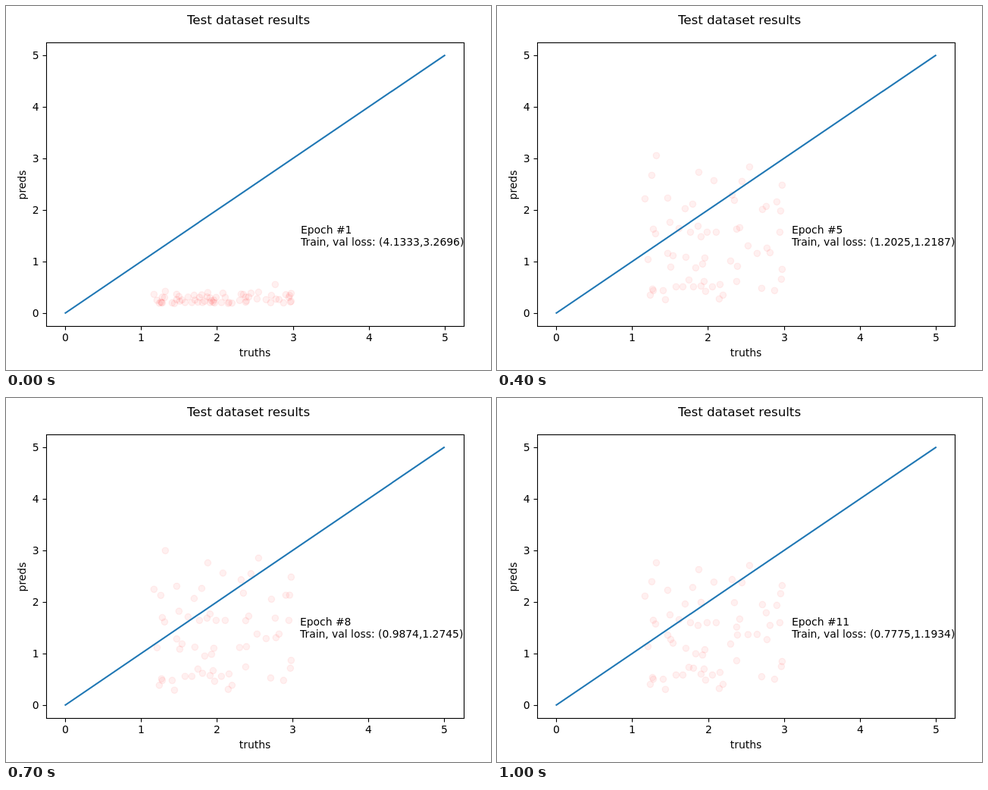
An HTML page that plays this animation: 640x480 px, repeating every 1100 ms.

```html
<!DOCTYPE html>
<html lang="en">
<head>
<meta charset="utf-8">
<title>Test dataset results</title>
<style>
  html, body { margin: 0; width: 100%; height: 100%; overflow: hidden; background: #fff; }
  svg { display: block; width: 640px; height: 480px; }
  text { font: 13.89px "DejaVu Sans", sans-serif; fill: #000; }
  .title { font-size: 16.67px; }
  .mid { text-anchor: middle; }
  .end { text-anchor: end; }
  .axis { fill: none; stroke: #000; stroke-width: 1.11; }
  .dot { fill: red; stroke: red; stroke-width: 1.39; fill-opacity: .06; stroke-opacity: .06; }
  .diagonal { stroke: rgb(31, 119, 180); stroke-width: 2.08; stroke-linecap: square; }
</style>
</head>
<body>
<svg id="plot" viewBox="0 0 640 480"></svg>
<script>
const STEP = 100, X0 = 78, Y0 = 405.5;
const plot = document.getElementById('plot');

// Per epoch: losses, pixels per unit on x, share of drift, heights of the knots.
const KNOTS = [197, 254, 298, 345, 387];
const EPOCHS = [
  ['4.1333,3.2696', 100.2, 0, [376, 380, 384, 389, 392]],
  ['2.9986,2.6180', 100.05, 0, [330, 349, 362, 378, 390]],
  ['1.7767,1.9574', 100.2, 0, [253, 296, 326, 360, 388]],
  ['1.3862,1.4571', 100.2, 0, [217, 269, 308, 350, 387]],
  ['1.2025,1.2187', 100.2, 0, KNOTS],
  ['1.0418,1.2343', 100.2, .15, [193, 250, 294, 343, 386]],
  ['0.9229,1.2898', 100.05, .3, [194, 248, 291, 341, 386]],
  ['0.9874,1.2745', 100.05, .45, [201, 252, 293, 340, 385]],
  ['1.1571,1.2613', 100.05, .6, [208, 256, 295, 340, 385]],
  ['0.9136,1.2207', 100.2, .8, [213, 259, 296, 339, 384]],
  ['0.7775,1.1934', 100.25, 1, [217, 261, 296, 337, 384]]
];

// x, height, late drift
const POINTS = [
  [195, 254], [210, 197], [199, 334], [206, 294], [209, 300], [202, 381],
  [205, 373], [206, 375], [219, 375], [222, 387], [225, 253, -7], [228, 285],
  [225, 326, -8], [229, 344, -18], [232, 329], [236, 370], [240, 293], [245, 370],
  [248, 267], [249, 331, 5], [253, 361], [255, 298], [258, 261, -17], [259, 370, -9],
  [262, 345], [265, 290, 10], [266, 219, -8], [269, 304, -32], [271, 340, 6], [269, 369],
  [274, 332, 6], [273, 363], [275, 376], [277, 298], [286, 230], [284, 370],
  [289, 298], [293, 386], [294, 367], [298, 381], [308, 336, -5], [310, 249, -18],
  [313, 256, 7], [316, 294, 9], [316, 363, -11], [317, 343, -23], [320, 292], [323, 231],
  [333, 212, -8], [331, 316], [343, 326, -9], [349, 372], [350, 268], [356, 319, 4],
  [360, 325, -20], [366, 375], [369, 258, 9], [373, 298], [374, 270, -16], [376, 236],
  [375, 360], [376, 347, 8]
];

// Outliers follow their own heights.
const OUTLIERS = [
  [204, [390, 197, 70, 140, 223, 240, 254, 260, 264, 252, 242]],
  [355, [367, 312, 243, 252, 264, 271, 277, 290, 301, 292, 283]]
];

function add(tag, attrs, text = '') {
  const el = document.createElementNS('http://www.w3.org/2000/svg', tag);
  for (const key in attrs) el.setAttribute(key, attrs[key]);
  el.textContent = text;
  return plot.appendChild(el);
}

const label = (x, y, text, cls = '') => add('text', { x, y, class: cls }, text);
const dot = x => add('circle', { cx: x + .3, r: 4.17, class: 'dot' });

function remap(y, to) {
  let i = 0;
  while (i < KNOTS.length - 2 && y > KNOTS[i + 1]) i++;
  const part = (y - KNOTS[i]) / (KNOTS[i + 1] - KNOTS[i]);
  return to[i] + part * (to[i + 1] - to[i]);
}

const dots = POINTS.map(([x]) => dot(x));
const strays = OUTLIERS.map(([x]) => dot(x));
const diagonal = add('line', { x1: X0 + .4, y1: 404.8, y2: 65.2, class: 'diagonal' });
add('rect', { x: 53.5, y: 48.5, width: 551, height: 374, class: 'axis' });

const ticks = [];
for (let i = 0; i <= 5; i++) {
  const y = Y0 - 68 * i;
  add('path', { d: `M53.5 ${y}h-5`, class: 'axis' });
  label(43.5, y + 4.7, i, 'end');
  ticks.push({ mark: add('path', { class: 'axis' }), text: label(0, 442, i, 'mid') });
}

label(320, 24, 'Test dataset results', 'title mid');
label(328.5, 462, 'truths', 'mid');
add('text', { transform: 'translate(26 236) rotate(-90)', class: 'mid' }, 'preds');
const epochText = label(0, 300, '');
const lossText = label(0, 316, '');

function show(n) {
  const [loss, unit, share, levels] = EPOCHS[n];
  const px = v => Math.round(X0 + v * unit);
  POINTS.forEach(([, y, drift = 0], i) =>
    dots[i].setAttribute('cy', remap(y, levels) + drift * share + .3));
  OUTLIERS.forEach(([, path], i) => strays[i].setAttribute('cy', path[n] + .3));
  ticks.forEach(({ mark, text }, i) => {
    mark.setAttribute('d', `M${px(i) + .5} 422.5v5`);
    text.setAttribute('x', px(i) + .5);
  });
  diagonal.setAttribute('x2', X0 + 5 * unit - .3);
  epochText.textContent = `Epoch #${n + 1}`;
  lossText.textContent = `Train, val loss: (${loss})`;
  for (const el of [epochText, lossText]) el.setAttribute('x', px(3.1));
}

const start = performance.now();
let shown = -1;
function tick() {
  const n = Math.floor((performance.now() - start) / STEP) % EPOCHS.length;
  if (n !== shown) show(shown = n);
  requestAnimationFrame(tick);
}
tick();
</script>
</body>
</html>
```
